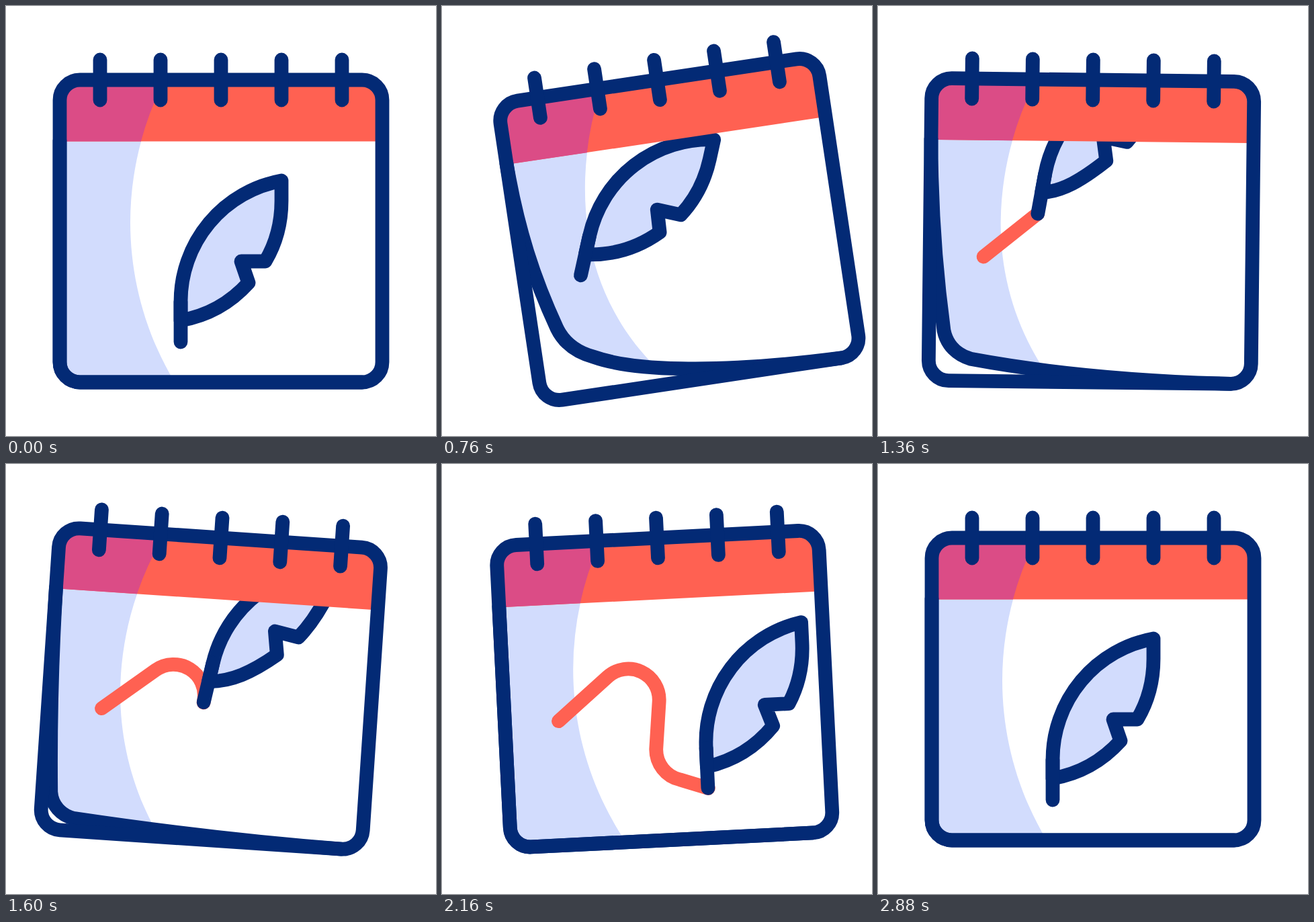
These frames come from a looping animation (640x640 px, 3000 ms). An HTML page:

```html
<!DOCTYPE html>
<html lang="en">
<head>
<meta charset="utf-8">
<title>Calendar and quill</title>
<style>
  html, body { margin: 0; width: 100%; height: 100%; overflow: hidden; background: #fff; }
  svg { display: block; width: 100%; height: 100%; }
  path, rect { stroke-width: 20.8; stroke-linecap: round; stroke-linejoin: round; }
  .line { fill: none; stroke: #032a75; }
  #shade, #vane { fill: #d2dcfd; }
  #ink { fill: none; stroke: #ff6152; }
</style>
</head>
<body>
<svg viewBox="0 0 640 640">
  <clipPath id="clip"><path id="page"/></clipPath>
  <g id="calendar">
    <g clip-path="url(#clip)">
      <path id="shade"/>
      <path id="ink" d="M160 375 L236 313 A46 46 0 0 1 311 353 L303 424 A46 46 0 0 0 336 471 L378 486"/>
      <g id="quill">
        <path id="vane" class="line"/>
        <path class="line" d="M260 500 V440"/>
      </g>
    </g>
    <path fill="#ff6152" d="M88 118 H552 V201.5 H88 Z"/>
    <path fill="#db4c86" d="M88 118 H232.2 A463 463 0 0 0 200.9 201.5 H88 Z"/>
    <path id="edge" class="line"/>
    <rect class="line" x="80" y="110" width="480" height="450" rx="30"/>
    <path class="line" d="M140 80 v60 M230 80 v60 M320 80 v60 M410 80 v60 M500 80 v60"/>
  </g>
</svg>
<script>
const LOOP = 3000, STEP = 40;
const $ = id => document.getElementById(id);
const set = (id, name, value) => $(id).setAttribute(name, value);
const ink = $('ink'), inkLength = ink.getTotalLength();

const mix = (a, b, k) => a + (b - a) * k;
const part = (t, from, to) => Math.min(1, Math.max(0, (t - from) / (to - from)));

// Progress of a move, flat at both ends; x1 and x2 are its bezier handles.
function move(t, from, to, x1 = 1 / 3, x2 = 2 / 3) {
  const p = part(t, from, to);
  let lo = 0, hi = 1;
  for (let i = 0; i < 24; i++) {
    const m = (lo + hi) / 2, n = 1 - m;
    if (3 * x1 * m * n * n + 3 * x2 * m * m * n + m ** 3 < p) lo = m; else hi = m;
  }
  return lo * lo * (3 - 2 * lo);
}

const bump = (t, from, to) => Math.sin(Math.PI * part(t, from, to));

// Returns a function that writes a point shifted by k times (dx, dy).
const shifter = k => (x, y, dx, dy) => `${x + dx * k} ${y + dy * k} `;

function drawPage(k) {
  const p = shifter(k);
  const bend = '80 200 C' +
    p(80, 300, 2, 0) + p(80, 420, 15, -45) + p(80, 530, 38, -76) +
    p(80, 546.6, 46, -67.6) + p(93.4, 560, 49.6, -66) + p(110, 560, 56, -56) +
    p(250, 560, -35, -30) + p(390, 560, -60, -4) + '530 560';
  set('edge', 'd', 'M' + bend);
  set('page', 'd', `M560 200 L${bend} H560 Z`);
  set('shade', 'd', 'M80 200 H201.5 A463 463 0 0 0 185 322 C' +
    p(185, 406, 0, -11) + p(208, 488, 0, -18) + p(251, 560, 3, -29) + 'V600 H60 V200 Z');
}

function drawVane(k) {
  const p = shifter(k);
  set('vane', 'd', 'M260 468 V440 A183 183 0 0 1 410 260 L' + p(410, 290, -5, -6) +
    'C' + p(410, 325, -14, -9) + p(402, 353, -15, -9) + p(386, 380, -15, -9) +
    'L' + p(350, 380, -15, -10) + 'L' + p(361, 412, -15, -8) +
    'C' + p(333, 443, -18, -4) + p(300, 461, -10, 0) + '260 468');
}

function draw(t) {
  const go = move(t, 160, 850);
  const back = move(t, 2195, 2870);
  const written = inkLength * move(t, 930, 2195);
  const wiped = inkLength * move(t, 2240, 2800);

  const tilt = -9 * move(t, 190, 850, 0.4) + 13 * move(t, 850, 1650, 0.2) -
    7 * move(t, 1650, 2080) + 3 * move(t, 2080, 2860, 0.25);
  set('calendar', 'transform', `rotate(${tilt} 320 110)`);
  drawPage(1.05 * (go - move(t, 850, 2160, 0.15)));

  ink.style.visibility = written - wiped > 0.1 ? 'visible' : 'hidden';
  ink.style.strokeDasharray = `${Math.max(written - wiped, 0)} 2000`;
  ink.style.strokeDashoffset = -wiped;

  const pen = ink.getPointAtLength(written);
  const away = go - back;
  const lean = 22 * go - 12.5 * move(t, 950, 1400) - 9.5 * move(t, 1790, 2195);
  set('quill', 'transform', `translate(${mix(260, pen.x, away)} ${mix(500, pen.y, away)}) ` +
    `rotate(${lean}) translate(-260 -500)`);
  drawVane(bump(t, 160, 760) + bump(t, 930, 1840) + bump(t, 2195, 2870));
}

const start = performance.now();
function tick() {
  const t = (performance.now() - start) % LOOP;
  draw(Math.floor(t / STEP) * STEP);
  requestAnimationFrame(tick);
}
tick();
</script>
</body>
</html>
```
